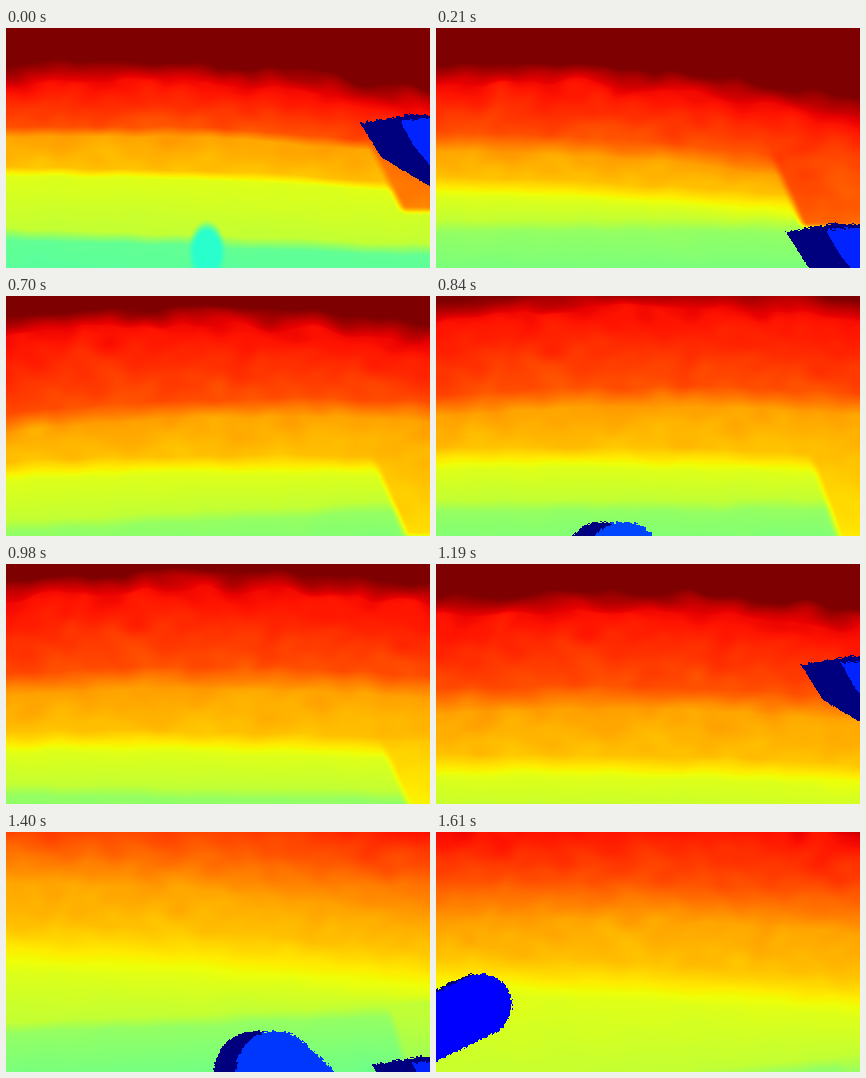
Recreate the animation shown at these times as a matplotlib script. Size 424 by 240 pixels, loop 1.68 s.

```python
import numpy as np
import matplotlib.pyplot as plt
from matplotlib.animation import FuncAnimation
from matplotlib.path import Path

W, H, FRAMES, STEP = 424, 240, 24, 70
X, Y = np.meshgrid(np.arange(W) + 0.5, np.arange(H) + 0.5)
JET = plt.get_cmap("jet", 1024)


def view(far, step, tread, floor, soft, corner):
    """Left and right heights of four depth edges, their blur, the wall corner."""
    return np.array([*far, *step, *tread, *floor, soft, *corner], float)


VIEWS = {
    0: view((48, 74), (104, 124), (144, 162), (206, 222), 5, (362, 112, 394, 178)),
    3: view((48, 84), (113, 150), (158, 184), (198, 198), 10, (328, 108, 365, 194)),
    7: view((52, 74), (151, 126), (194, 172), (262, 208), 8, (340, 128, 392, 230)),
    12: view((18, 16), (110, 108), (163, 170), (210, 209), 11, (372, 150, 402, 240)),
    17: view((46, 58), (138, 146), (203, 212), (250, 268), 12, (378, 212, 400, 240)),
    20: view((-45, -15), (28, 62), (116, 142), (196, 178), 24, (382, 172, 400, 235)),
    23: view((-10, -2), (72, 82), (144, 166), (270, 228), 20, (400, 225, 408, 240)),
}

# Wedge at the right: one outline carried along a path of offsets.
WEDGE_SHADOW = np.array([(354, 95), (404, 86), (430, 88), (430, 162), (376, 130)])
WEDGE_BODY = np.array([(394, 93), (430, 90), (430, 145), (408, 118)])
WEDGE_PATHS = [
    {0: (0, 0), 3: (-4, 109), 5: (4, 170)},
    {15: (75, -6), 17: (11, 6), 20: (12, 138), 21: (15, 165)},
]

# Rounded foot: two end points, radius, shadow width, depth.
FOOT_PATHS = [
    {4: (200, 285, 225, 305, 40, 22, .18), 6: (-50, 206, 15, 176, 31, 6, .115),
     7: (-40, 203, -8, 183, 25, 0, .11)},
    {10: (192, 277, 196, 277, 33, 22, .195), 12: (186, 259, 190, 259, 33, 22, .195),
     14: (178, 277, 182, 277, 33, 22, .195)},
    {18: (300, 285, 325, 305, 40, 22, .18), 20: (270, 239, 295, 262, 40, 22, .18),
     23: (-20, 205, 45, 173, 31, 6, .115)},
]


def smooth_noise(seed, size):
    """Wrapping noise with soft blotches and unit deviation."""
    white = np.random.default_rng(seed).normal(size=(H, W))
    fy, fx = np.fft.fftfreq(H)[:, None], np.fft.fftfreq(W)[None, :]
    low = np.exp(-2 * (np.pi * size) ** 2 * (1.8 * fx ** 2 + fy ** 2))
    field = np.fft.ifft2(np.fft.fft2(white) * low).real
    return field / field.std()


WAVES, GRAIN = smooth_noise(4, 8), smooth_noise(9, 6)
coarse = np.random.default_rng(2).uniform(-1.2, 1.2, (H // 2, W // 2))
JAG = coarse.repeat(2, axis=0).repeat(2, axis=1)


def along(path, frame):
    """Linear place on a keyed path, or None outside its time."""
    times = sorted(path)
    if not times[0] <= frame <= times[-1]:
        return None
    return np.array([np.interp(frame, times, part)
                     for part in zip(*(path[t] for t in times))])


def ramp(t):
    t = np.clip(t, 0, 1)
    return t * t * (3 - 2 * t)


def background(frame):
    ends, soft, corner = np.split(along(VIEWS, frame), [8, 9])
    left, right = ends.reshape(4, 2).T
    soft, chill = soft[0], max(0, 1 - frame / 3)

    # Each edge is a tilted line, arched more the farther away it is.
    u = X[0] / W
    arch = np.array([14, 8, 4, 0])
    far, step, tread, floor = (np.outer(left, 1 - u) + np.outer(right, u)
                               - np.outer(arch, 4 * u * (1 - u)))
    heights = np.maximum.accumulate(
        [far - 11, far + 9, step - soft, step + soft, tread - soft,
         tread + soft, floor - 6, floor + 6, floor + 90])
    levels = [1, .9, .825, .738, .705, .62, .587, .53 - .06 * chill, .46 - .02 * chill]

    waves = np.roll(WAVES, (-2 * frame, -9 * frame), (0, 1))
    grain = np.roll(GRAIN, (3 * frame, 7 * frame), (0, 1))
    ys = Y + waves * (0.6 + 2 * np.exp(-((Y - far) / 22) ** 2))
    v = np.column_stack([np.interp(ys[:, c], heights[:, c], levels) for c in range(W)])

    # Right of the corner the wall keeps its depth down to the corner's foot.
    x0, y0, x1, y1 = corner
    s = (Y - y0) / (y1 - y0)
    hold = v[int(y0), int(x0)] - 0.05 * s
    wall = v + np.maximum(hold - v, 0) * (1 - ramp((Y - y1) / 10))
    v += (wall - v) * ramp((X - x0 - (x1 - x0) * s + 6) / 12) * ramp((Y - y0 + 4) / 10)

    warm = ramp((v - 0.62) / 0.15) * ramp((1 - v) / 0.1)
    crease = np.exp(-((X - 75 + 0.45 * (Y - 40)) / 8) ** 2) * (Y < 140)
    v += warm * (0.004 * grain - 0.006 * crease) + 0.001 * grain * (v < 0.95)

    puddle = np.hypot((X - 201) / 17, (Y - 224 - 16 * frame) / 28)
    return v + (0.4 - v) * ramp((1.2 - puddle) / 0.5) * ramp(2 * chill)


def in_outline(points):
    pixels = np.column_stack([(X + JAG).ravel(), (Y + JAG).ravel()])
    return Path(points).contains_points(pixels).reshape(H, W)


def in_capsule(x0, y0, x1, y1, radius):
    dx, dy = x1 - x0, y1 - y0
    t = np.clip(((X - x0) * dx + (Y - y0) * dy) / (dx * dx + dy * dy), 0, 1)
    return np.hypot(X - x0 - t * dx, Y - y0 - t * dy) < radius + JAG


def draw_feet(v, frame):
    for path in WEDGE_PATHS:
        offset = along(path, frame)
        if offset is not None:
            v[in_outline(WEDGE_SHADOW + offset)] = 0
            v[in_outline(WEDGE_BODY + offset)] = .16
    for path in FOOT_PATHS:
        foot = along(path, frame)
        if foot is not None:
            x0, y0, x1, y1, radius, shadow, depth = foot
            v[in_capsule(x0 - shadow, y0, x1 - shadow, y1, radius)] = 0
            v[in_capsule(x0, y0, x1, y1, radius)] = depth


def picture(frame):
    v = background(frame)
    draw_feet(v, frame)
    return JET(np.clip(v, 0, 1))[..., :3]


fig = plt.figure(figsize=(W / 100, H / 100), dpi=100)
ax = fig.add_axes([0, 0, 1, 1])
ax.axis("off")
image = ax.imshow(picture(0), interpolation="nearest", aspect="auto")


def update(frame):
    image.set_data(picture(frame))
    return [image]


anim = FuncAnimation(fig, update, frames=FRAMES, interval=STEP,
                     repeat=True, repeat_delay=0)
plt.show()
```
